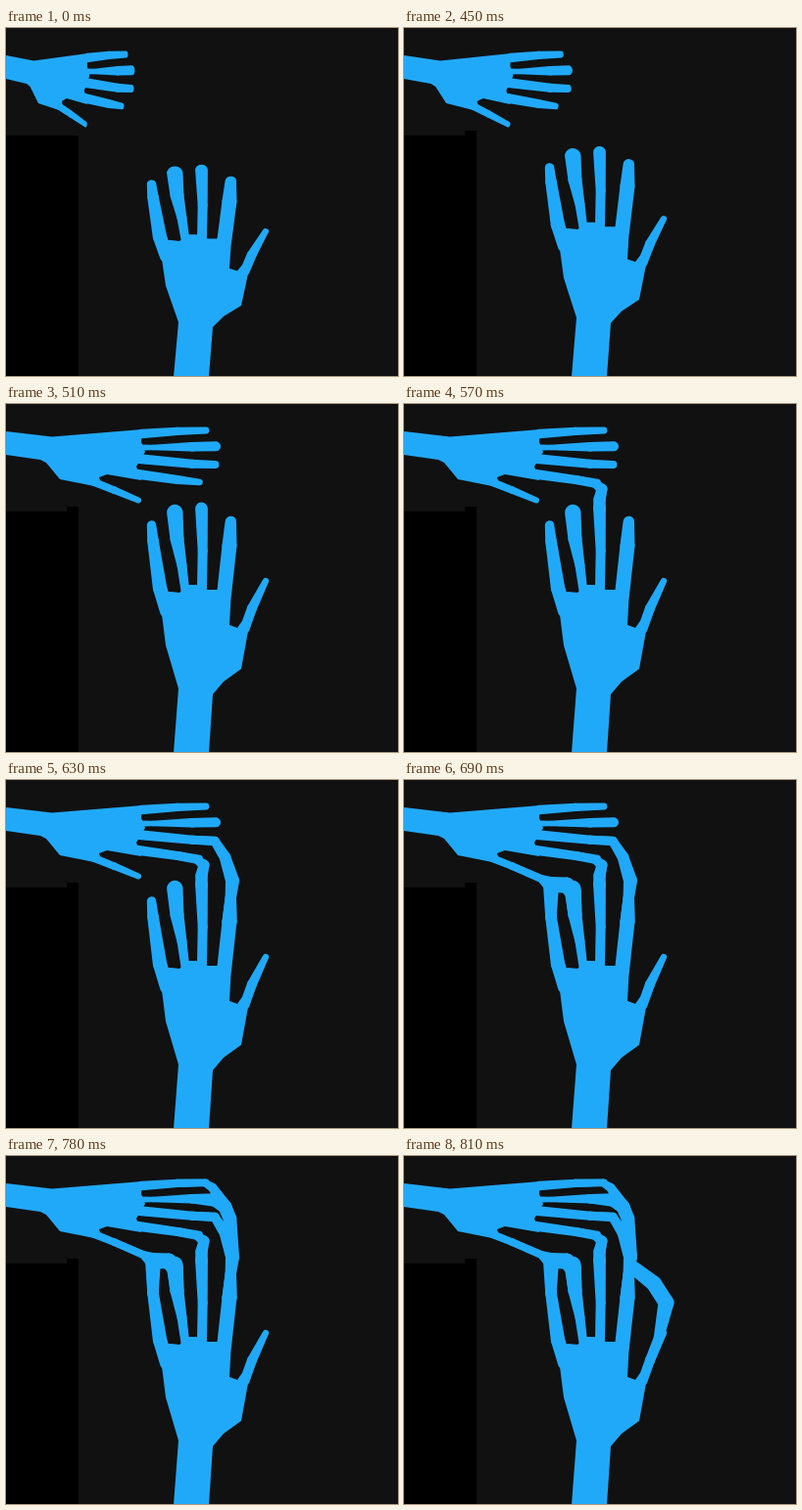
These frames come from a looping animation (400x356 px, 1.11 s). An HTML page with a canvas:

```html
<!DOCTYPE html>
<html lang="en">
<head>
<meta charset="utf-8">
<title>Joining hands</title>
<style>
html, body { margin: 0; width: 100%; height: 100%; overflow: hidden; background: #111; }
canvas { display: block; }
</style>
</head>
<body>
<canvas id="stage" width="400" height="356"></canvas>
<script>
const W = 400, H = 356, LOOP = 1110, START = 450, STEP = 30, LAST = 12;
const BLUE = '#21a9f9';
const ctx = document.getElementById('stage').getContext('2d');

// A palm is a polygon; a finger is a chain of joints [x, y, radius].
const reach = {
  palm: [[0, 28], [47, 33.5], [139, 26], [138, 39], [142, 49], [133, 64], [138, 78], [103, 72],
    [95, 75], [97, 81], [90, 84], [55, 77], [41, 60], [35, 57], [0, 52]],
  little: [[138, 30.5, 4.7], [175, 27.8, 4.1], [204, 27, 3.4]],
  ring: [[138, 44.5, 3], [150, 44.5, 2.7], [190, 43.8, 4.8], [214, 43.3, 5]],
  middle: [[135, 56, 5], [190, 61.3, 4.5], [213.5, 62, 4]],
  index: [[132, 71.5, 5], [175, 77.5, 4.5], [197.5, 80, 3.3]],
  thumb: [[90, 80, 4], [110, 88, 3.8], [135, 98.5, 3]]
};

const raised = {
  palm: [[171, 357], [176, 291], [163, 247], [159, 215], [152, 193], [168, 192], [177, 193],
    [186, 185], [194, 185], [206, 190], [214, 190], [230, 190], [228, 226], [236, 229],
    [241, 222], [248, 227], [240, 271], [222, 284], [211, 297], [207, 357]],
  little: [[148.5, 124, 4.7], [150, 140, 5.8], [157, 188, 7.2], [164, 212, 7]],
  ring: [[172.3, 111, 8.2], [174.5, 138, 7], [179.5, 165, 5], [183, 192, 4.3]],
  middle: [[199.5, 107, 6.4], [200.7, 150, 5], [200, 188, 5]],
  index: [[229.3, 120.5, 5.7], [228, 145, 7.5], [222.5, 195, 7.5]],
  thumb: [[265, 181, 3.2], [251, 209, 5], [243.5, 230, 5]]
};

// Knuckles where the hands meet, shared by neighbouring limbs.
const bend = [202, 87, 5.5], side = [231, 103, 7], corner = [150, 107, 8], crest = [223.5, 52, 7];

// Each link grows from the upper hand, then is completed from the lower one.
const links = [
  [[[175, 77.5, 4.5], [195, 81.5, 4.2], bend], [bend, [199.5, 98, 6.2], raised.middle[0]]],
  [[reach.middle[1], [213, 62.5, 4.7], [223.5, 79, 5.8]], [[223.5, 79, 5.8], side, raised.index[0], raised.index[1]]],
  [[reach.thumb[1], [140, 101, 4], corner, raised.little[1]], [corner, [166, 107.5, 8], [172.5, 115, 8.4], raised.ring[1]]],
  [[reach.ring[2], [213, 45.5, 6.2], crest], [crest, [228.5, 64, 6.8], side]],
  [[reach.little[1], [203, 27.5, 3.8], [211, 32.5, 4.6], crest],
    [[235, 115, 7], [255, 130.5, 8], [267.5, 150, 8], [260, 186, 5.2], raised.thumb[1]]]
];

function polygon(points) {
  ctx.beginPath();
  for (const [x, y] of points) ctx.lineTo(x, y);
  ctx.fill();
}

// Tapered capsules from joint to joint.
function limb(joints) {
  for (let i = 1; i < joints.length; i++) {
    const [x1, y1, r1] = joints[i - 1], [x2, y2, r2] = joints[i];
    const dir = Math.atan2(y2 - y1, x2 - x1);
    const spread = Math.acos((r1 - r2) / Math.hypot(x2 - x1, y2 - y1));
    ctx.beginPath();
    ctx.arc(x1, y1, r1, dir + spread, dir - spread + 2 * Math.PI);
    ctx.arc(x2, y2, r2, dir - spread, dir + spread);
    ctx.fill();
  }
}

// The hand stretches from its own stage edge.
function hand({ palm, ...fingers }, sx, sy) {
  ctx.save();
  ctx.translate(0, H * (1 - sy));
  ctx.scale(sx, sy);
  polygon(palm);
  Object.values(fingers).forEach(limb);
  ctx.restore();
}

function draw(time) {
  const t = time % LOOP;
  const step = t < START ? -1 : Math.min(LAST, Math.floor((t - START) / STEP));

  ctx.fillStyle = '#111';
  ctx.fillRect(0, 0, W, H);
  ctx.fillStyle = '#000';
  ctx.fillRect(0, 110, 74, H - 110);
  if (step >= 0) ctx.fillRect(62, 105, 12, 5);

  ctx.fillStyle = BLUE;
  hand(reach, step < 0 ? 0.6 : step < 2 ? 0.785 : 1, 1);
  hand(raised, 1, step < 0 ? 0.847 : step < 1 ? 0.92 : 1);
  links.flat().slice(0, Math.max(0, step - 2)).forEach(limb);
}

let begin;
function tick(now) {
  begin ??= now;
  draw(now - begin);
  requestAnimationFrame(tick);
}
draw(0);
requestAnimationFrame(tick);
</script>
</body>
</html>
```
